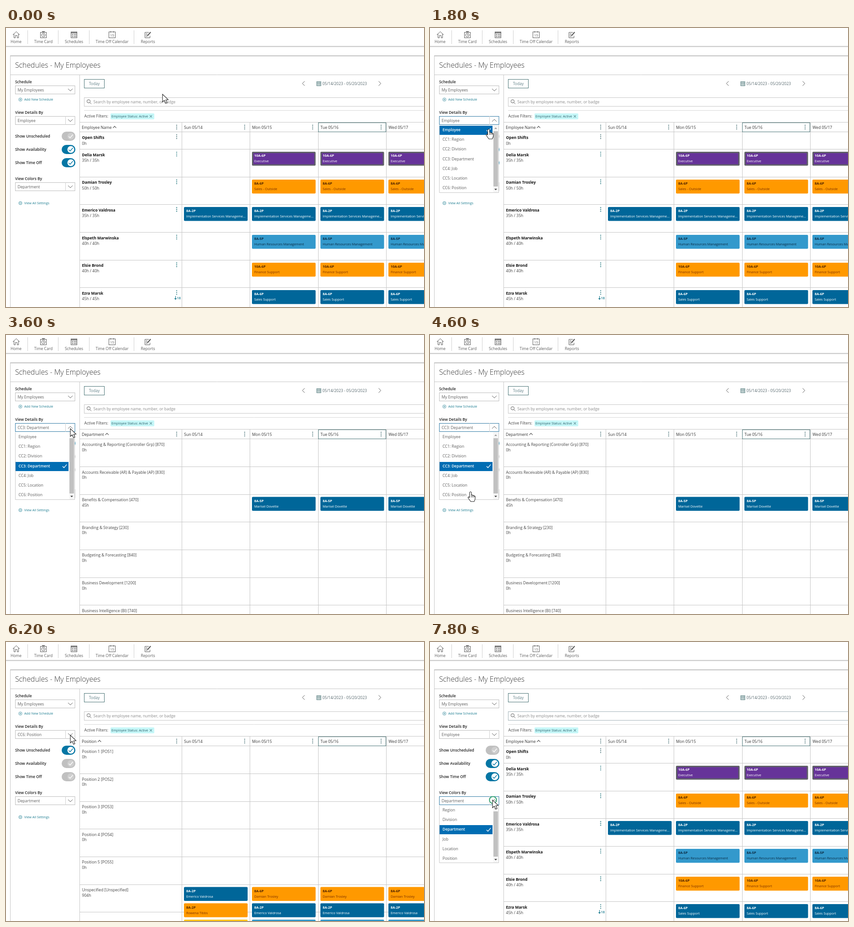
An HTML page with a canvas for the animation above (8 s loop, 916 by 611 pixels).

```html
<!DOCTYPE html>
<html lang="en">
<head>
<meta charset="utf-8">
<title>Schedules</title>
<style>
html, body { margin: 0; width: 100%; height: 100%; overflow: hidden; background: #fff; }
canvas { display: block; }
</style>
</head>
<body>
<canvas id="stage" width="916" height="611"></canvas>
<script>
const c = document.getElementById('stage').getContext('2d');
const LOOP = 8000, STEP = 200;
const INK = '#222', SOFT = '#5c5c5c', GRID = '#c6c6c6', TEAL = '#1c7c90', EDGE = '#4a7476';
const COLS = [385.5, 534.5, 684.5, 833.5];
const DAYS = ['Sun 05/14', 'Mon 05/15', 'Tue 05/16', 'Wed 05/17'];
const PITCH = 60.6;

const STYLES = {
  purple: { fill: '#663399', head: '#fff', body: '#fff', frame: '#606068' },
  orange: { fill: '#ff9900', head: '#4a2000', body: '#7a3000' },
  navy: { fill: '#006699', head: '#fff', body: '#fff' },
  sky: { fill: '#3399cc', head: '#0c2c44', body: '#0c2c44' },
  yellow: { fill: '#ffc61a', head: '#333', body: '#333' }
};

const STAFF = [
  ['Delia Marsk', '35h / 35h', '10A-6P', 'Executive', 'purple', 1],
  ['Damian Trosley', '50h / 50h', '8A-6P', 'Sales - Outside', 'orange', 1],
  ['Emerico Valdrosa', '35h / 35h', '8A-2P', 'Implementation Services Manageme...', 'navy', 0],
  ['Elspeth Marwinska', '40h / 40h', '8A-5P', 'Human Resources Management', 'sky', 1],
  ['Elsie Brond', '40h / 40h', '10A-6P', 'Finance Support', 'orange', 1],
  ['Ezra Marsk', '45h / 45h', '8A-6P', 'Sales Support', 'navy', 1]
];
const DEPARTMENTS = [
  'Accounting & Reporting (Controller Grp) [870]', 'Accounts Receivable (AR) & Payable (AP) [830]',
  'Benefits & Compensation [470]', 'Branding & Strategy [230]', 'Budgeting & Forecasting [840]',
  'Business Development [1200]', 'Business Intelligence (BI) [740]'
];
const LEVELS = ['Region', 'Division', 'Department', 'Job', 'Location', 'Position'];
const DETAILS = ['Employee', ...LEVELS.map((s, i) => `CC${i + 1}: ${s}`)];

// time, x, y of the pointer tip
const PATH = [
  [0, 343, 145], [200, 343, 145], [1200, 141, 203], [1500, 141, 203], [1800, 128, 221],
  [2300, 104, 287], [2600, 103, 287], [3000, 141, 205], [3600, 141, 205], [4700, 87, 346],
  [5200, 87, 346], [6000, 141, 204], [6500, 141, 204], [6900, 116, 214], [7100, 116, 214],
  [7600, 137, 346], [8000, 137, 346]
];
const CLICKS = [[1400, 141, 203], [2500, 105, 287], [3100, 141, 205], [5000, 87, 347],
  [6200, 141, 204], [6885, 115, 219], [7690, 138, 346]];

function text(s, x, y, color = INK, size = 8.6, weight = 400, align = 'left') {
  c.font = `${weight} ${size}px "Open Sans", "Noto Sans", sans-serif`;
  c.fillStyle = color;
  c.textAlign = align;
  c.fillText(s, x, y + size * 0.36);
  return c.measureText(s).width;
}
const label = (s, y) => text(s, 20, y, INK, 8.4, 600);
function rect(x, y, w, h, fill) {
  c.fillStyle = fill;
  c.fillRect(x, y, w, h);
}
function box(x, y, w, h, color, width = 1) {
  c.strokeStyle = color;
  c.lineWidth = width;
  c.strokeRect(x, y, w, h);
}
function round(x, y, w, h, r, fill) {
  c.beginPath();
  c.roundRect(x, y, w, h, r);
  c.fillStyle = fill;
  c.fill();
}
function line(points, color = SOFT, width = 1) {
  c.beginPath();
  for (let i = 0; i < points.length; i += 2) c.lineTo(points[i], points[i + 1]);
  c.strokeStyle = color;
  c.lineWidth = width;
  c.stroke();
}
function circle(x, y, r, color, width) {
  c.beginPath();
  c.arc(x, y, r, 0, Math.PI * 2);
  if (width) {
    c.strokeStyle = color;
    c.lineWidth = width;
    c.stroke();
  } else {
    c.fillStyle = color;
    c.fill();
  }
}
const hline = (x, y, color = GRID) => line([x, y, 916, y], color);
const chevron = (x, y, w, h, color = SOFT, width = 1) => line([x - w, y - h, x, y + h, x + w, y - h], color, width);
const check = (x, y, color) => line([x - 4, y, x - 1, y + 3, x + 5, y - 4], color, 1.4);
function dots(x, y, color = '#6f8f93') {
  for (const d of [-4, 0, 4]) circle(x, y + d, 1.2, color);
}
function triangle(x, y, dir, color) {
  c.beginPath();
  c.moveTo(x - 3, y - 1.5 * dir);
  c.lineTo(x + 3, y - 1.5 * dir);
  c.lineTo(x, y + 1.8 * dir);
  c.fillStyle = color;
  c.fill();
}
function calendar(x, y, w, h, color) {
  box(x - w / 2, y - h / 2, w, h, color);
  line([x - w / 2, y - h / 2 + 3, x + w / 2, y - h / 2 + 3], color);
}

function drawNav() {
  const items = [['Home', 22], ['Time Card', 82], ['Schedules', 149], ['Time Off Calendar', 232.5], ['Reports', 311]];
  for (const [s, x] of items) text(s, x, 29.5, SOFT, 8.5, 400, 'center');
  for (const x of [47.5, 114.5, 182.5, 280.5]) line([x, 5, x, 35], '#d0d0d0');

  line([15, 15, 22.5, 8, 30, 15]);
  line([17.5, 13, 17.5, 21.5, 20.5, 21.5, 20.5, 16.5, 24.5, 16.5, 24.5, 21.5, 27.5, 21.5, 27.5, 13]);

  box(75.5, 9.5, 13, 12, SOFT);
  circle(82, 15.5, 4, SOFT, 1);
  line([82, 13, 82, 16, 84, 16]);
  line([79, 8, 85, 8], SOFT, 1.6);

  box(142.5, 8.5, 13, 13, SOFT);
  line([142, 10.5, 156, 10.5], SOFT, 2);
  for (const x of [145.5, 149.5, 153]) line([x, 13, x, 20], SOFT, 1.6);
  line([143, 16.5, 155, 16.5], '#fff');

  box(225.5, 8.5, 14, 13, SOFT);
  line([229.5, 7, 229.5, 10], SOFT);
  line([235.5, 7, 235.5, 10], SOFT);
  text('15', 232.5, 16, SOFT, 7.5, 400, 'center');

  line([313, 9.5, 304.5, 9.5, 304.5, 21.5, 315.5, 21.5, 315.5, 17]);
  line([310, 17, 317, 9], SOFT, 2.2);
  for (const y of [12.5, 15.5, 18.5]) line([306.5, y, 310, y]);

  rect(0, 39.5, 916, 2, '#c4c4c4');
}

function drawFrame(focus) {
  rect(9, 60, 907, 2, '#c2c2c2');
  line([9.5, 61, 9.5, 611], GRID);
  text('Schedules - My Employees', 20, 81.5, '#333', 15.8, 300);
  hline(9, 102.5);
  line([161.5, 102, 161.5, 611], GRID);

  box(171.5, 112.5, 44, 19, EDGE);
  text('Today', 193.5, 121.5, '#5f7f86', 8.6, 400, 'center');
  line([654.5, 116.5, 649.5, 121.5, 654.5, 126.5], SOFT);
  line([816.5, 116.5, 821.5, 121.5, 816.5, 126.5], SOFT);
  calendar(685.5, 122, 9, 9, EDGE);
  line([684, 117.5, 684, 126.5], EDGE, 0.7);
  line([687.5, 117.5, 687.5, 126.5], EDGE, 0.7);
  line([681, 123.5, 690, 123.5], EDGE, 0.7);
  text('05/14/2023 - 05/20/2023', 693.5, 122, '#58696f', 8.5);

  const edges = ['#c6c6c6', '#a3b3b8', '#536a8c'];
  box(171.5, 152.5, 760, 19, edges[focus], focus === 2 ? 1.5 : 1);
  circle(181, 160.5, 3.6, SOFT, 1);
  line([183.7, 163.2, 187, 166.5]);
  text('Search by employee name, number, or badge', 191.5, 162, '#8a8a8a', 8.5);
  if (focus === 2) line([192.5, 156, 192.5, 168], '#222');
  hline(171, 180.5, '#d8d8d8');
  text('Active Filters:', 171.5, 193, '#444', 8.6);
  round(229, 187, 96, 13, 2, '#c6f7f8');
  text('Employee Status: Active', 231, 193.7, '#2c626c', 7.3);
  line([315, 191, 320, 196], '#2c626c');
  line([320, 191, 315, 196], '#2c626c');
}

function select(value, y, open, active, divider = true) {
  rect(20, y, 131, 19, '#fff');
  box(20.5, y + 0.5, 130.5, 18, active ? '#2f7aa5' : '#bcbcbc');
  if (divider) line([130.5, y, 130.5, y + 19], '#cfcfcf');
  text(value, 25.5, y + 9.7, SOFT);
  chevron(141, y + 9.5, 5, open ? -2.5 : 2.5);
}
function toggle(name, y, on) {
  label(name, y);
  round(122, y - 10, 30, 20, 10, on ? '#0476a4' : '#c0c0c0');
  circle(142, y, 7.5, on ? '#fff' : '#cecece');
  check(141.5, y + 0.5, on ? '#0476a4' : '#fff');
}
function menu(items, chosen, first, top, bottom) {
  rect(20, top, 131, bottom - top, '#fff');
  line([20.5, top, 20.5, bottom - 0.5, 150.5, bottom - 0.5, 150.5, top], '#c8c8c8');
  items.forEach((s, i) => {
    const y = first + i * 21.2, hit = i === chosen;
    if (hit) {
      rect(21, Math.round(y) - 9, 116, 20, '#006db3');
      check(128, y + 1, '#fff');
    }
    text(s, 27.5, y, hit ? '#fff' : SOFT, hit ? 8.4 : 8.6, hit ? 600 : 400);
  });
  rect(138.5, top, 11, bottom - top - 1, '#f6f6f6');
  rect(139, top + 13, 10, bottom - top - 27, '#c1c1c1');
  triangle(144, top + 6.5, -1, '#999');
  triangle(144, bottom - 7.5, 1, '#444');
}

function drawSidebar(s) {
  label('Schedule', 118);
  select('My Employees', 126, false, false, false);
  circle(31.5, 156.7, 3.6, TEAL, 0.7);
  line([29.5, 156.7, 33.5, 156.7], TEAL, 0.7);
  line([31.5, 154.7, 31.5, 158.7], TEAL, 0.7);
  text('Add New Schedule', 40, 156.5, TEAL, 7.3);

  label('View Details By', 185);
  select(DETAILS[s.detail], 193, s.list === 'details', s.list === 'details' || s.held);
  const staff = s.detail === 0;
  toggle('Show Unscheduled', 237, !staff);
  toggle('Show Availability', 266, staff);
  toggle('Show Time Off', 295, staff);
  label('View Colors By', 330);
  select('Department', 338, s.list === 'colors', s.list === 'colors');

  circle(31.5, 383.5, 3.4, TEAL, 0.8);
  circle(31.5, 383.5, 1.3, TEAL, 0.6);
  text('View All Settings', 40, 383, TEAL, 7.3);

  if (s.list === 'details') menu(DETAILS, s.detail, 223, 213, 361);
  if (s.list === 'colors') menu(LEVELS, 2, 368, 358, 484);
}

function card(col, y, hours, note, style) {
  const k = STYLES[style], x = Math.round(COLS[col] + 4.6);
  round(x, y, 139.5, 30.5, 2, k.frame || k.fill);
  if (k.frame) rect(x + 3, y + 3, 133.5, 24.5, k.fill);
  text(hours, x + 5, y + 8.7, k.head, 7.4, 700);
  text(note, x + 5, y + 20.7, k.body, 7.3, k.body === '#fff' ? 500 : 400);
}
function rowLines(top) {
  for (let y = top; y < 611; y += PITCH) hline(161, Math.floor(y) + 0.5);
}

function drawHeader(title) {
  hline(161, 206.5);
  hline(161, 227.5);
  for (const x of COLS) line([x, 206, x, 611], GRID);
  const w = text(title, 166, 217.5, '#333', 8.6);
  chevron(166 + w + 6.5, 217, 3.5, -2, '#333', 1.1);
  dots(374, 217);
  DAYS.forEach((d, i) => {
    text(d, COLS[i] + 4.8, 217.7, '#333', 8.6);
    dots(COLS[i] + 137.5, 217);
  });
  box(684.5, 207.5, 148, 20, EDGE);
}

function drawStaff() {
  drawHeader('Employee Name');
  text('Open Shifts', 166.5, 240, '#111', 8.5, 700);
  text('0h', 166.5, 253, '#444');
  dots(374, 238);
  rowLines(265.6);
  STAFF.forEach(([name, total, hours, note, style, from], i) => {
    const y = 265.6 + i * PITCH;
    text(name, 166.5, y + 12.2, '#111', 8.5, 700);
    text(total, 166.5, y + 24.3, '#444');
    dots(374, y + 10.5, '#4f9298');
    for (let col = from; col < 4; col++) card(col, Math.floor(y + 6), hours, note, style);
  });
  line([371.5, 587, 371.5, 594], TEAL, 1.2);
  triangle(371.5, 593.5, 1, TEAL);
  text('18', 374.5, 591.5, TEAL, 7.5, 600);
}

function drawGroups(names, total) {
  rowLines(228 + PITCH);
  names.forEach((name, i) => {
    const y = 228 + i * PITCH;
    text(name, 166.5, y + 12, '#444', 8.55);
    text(total(i), 166.5, y + 23.5, '#444');
  });
}
function drawDepartments() {
  drawHeader('Department');
  drawGroups(DEPARTMENTS, i => i === 2 ? '45h' : '0h');
  for (let col = 1; col < 4; col++) card(col, 354.5, '8A-5P', 'Marisel Dovette', 'navy');
}
function drawPositions() {
  drawHeader('Position');
  const names = [1, 2, 3, 4, 5].map(n => `Position ${n} [POS${n}]`).concat('Unspecified [Unspecified]');
  drawGroups(names, i => i === 5 ? '904h' : '0h');
  const lead = ['8A-2P', 'Emerico Valdrosa', 'navy'];
  for (let col = 0; col < 4; col++) {
    const stack = col
      ? [['8A-6P', 'Damian Trosley', 'orange'], lead, ['', '', 'sky']]
      : [lead, ['8A-2P', 'Rowena Tibbs', 'orange'], ['', '', 'yellow']];
    stack.forEach((s, i) => card(col, 536.5 + i * 35.7, ...s));
  }
}

function pointerAt(t) {
  const i = PATH.findIndex((p, n) => n && t <= p[0]);
  const [t0, x0, y0] = PATH[i - 1], [t1, x1, y1] = PATH[i];
  const k = (t - t0) / (t1 - t0), e = k * k * (3 - 2 * k);
  return [x0 + (x1 - x0) * e, y0 + (y1 - y0) * e];
}
function drawPointer(x, y, hand) {
  c.save();
  c.translate(x, y);
  c.beginPath();
  if (hand) {
    c.moveTo(-1.5, 12);
    c.lineTo(-1.5, 2);
    c.quadraticCurveTo(0.5, -1, 2.5, 2);
    c.lineTo(2.5, 8);
    c.quadraticCurveTo(5, 6.5, 5.5, 9);
    c.quadraticCurveTo(8, 7.5, 8.5, 10);
    c.quadraticCurveTo(11, 9.5, 11, 12);
    c.quadraticCurveTo(11, 18, 8.5, 22);
    c.lineTo(1, 22);
    c.quadraticCurveTo(-2, 18, -5, 13.5);
    c.quadraticCurveTo(-4.5, 10.5, -1.5, 13);
  } else {
    const p = [0, 0, 0, 17, 4, 13.5, 7, 20, 10, 18.7, 7.2, 12.5, 12.5, 12];
    for (let i = 0; i < p.length; i += 2) c.lineTo(p[i], p[i + 1]);
  }
  c.closePath();
  c.fillStyle = '#fff';
  c.fill();
  c.strokeStyle = '#222';
  c.lineWidth = 1.1;
  c.stroke();
  if (hand) for (const px of [2.5, 5.5, 8.5]) line([px, 9, px, 13], '#222');
  c.restore();
}
function drawRings(t) {
  for (const [at, x, y] of CLICKS) {
    const age = t - at;
    if (age <= 0 || age > 400) continue;
    c.globalAlpha = age < 220 ? 1 : (400 - age) / 180;
    circle(x, y, age * 0.07, '#1d9a62', age < 150 ? 1.8 : 2.8);
    c.globalAlpha = 1;
  }
}

const within = (t, a, b) => t >= a && t < b;
function stateAt(t) {
  const details = within(t, 1600, 2600) || within(t, 3400, 5200) || within(t, 6400, 7200);
  const focused = within(t, 2600, 3000) || within(t, 5400, 5800) || within(t, 7200, 7800);
  return {
    detail: within(t, 2600, 5200) ? 3 : within(t, 5200, 7200) ? 6 : 0,
    list: details ? 'details' : t >= 7800 ? 'colors' : '',
    held: within(t, 5200, 5400),
    focus: focused ? 2 : t >= 7800 ? 1 : 0
  };
}

function draw(t) {
  const s = stateAt(t), [x, y] = pointerAt(t);
  rect(0, 0, 916, 611, '#fff');
  drawNav();
  drawFrame(s.focus);
  if (s.detail === 0) drawStaff();
  else if (s.detail === 3) drawDepartments();
  else drawPositions();
  drawSidebar(s);
  drawRings(t);
  drawPointer(x, y, s.list === 'details' && y > 212);
}

function tick() {
  const t = performance.now() % LOOP;
  draw(Math.floor(t / STEP) * STEP);
  requestAnimationFrame(tick);
}
tick();
</script>
</body>
</html>
```
